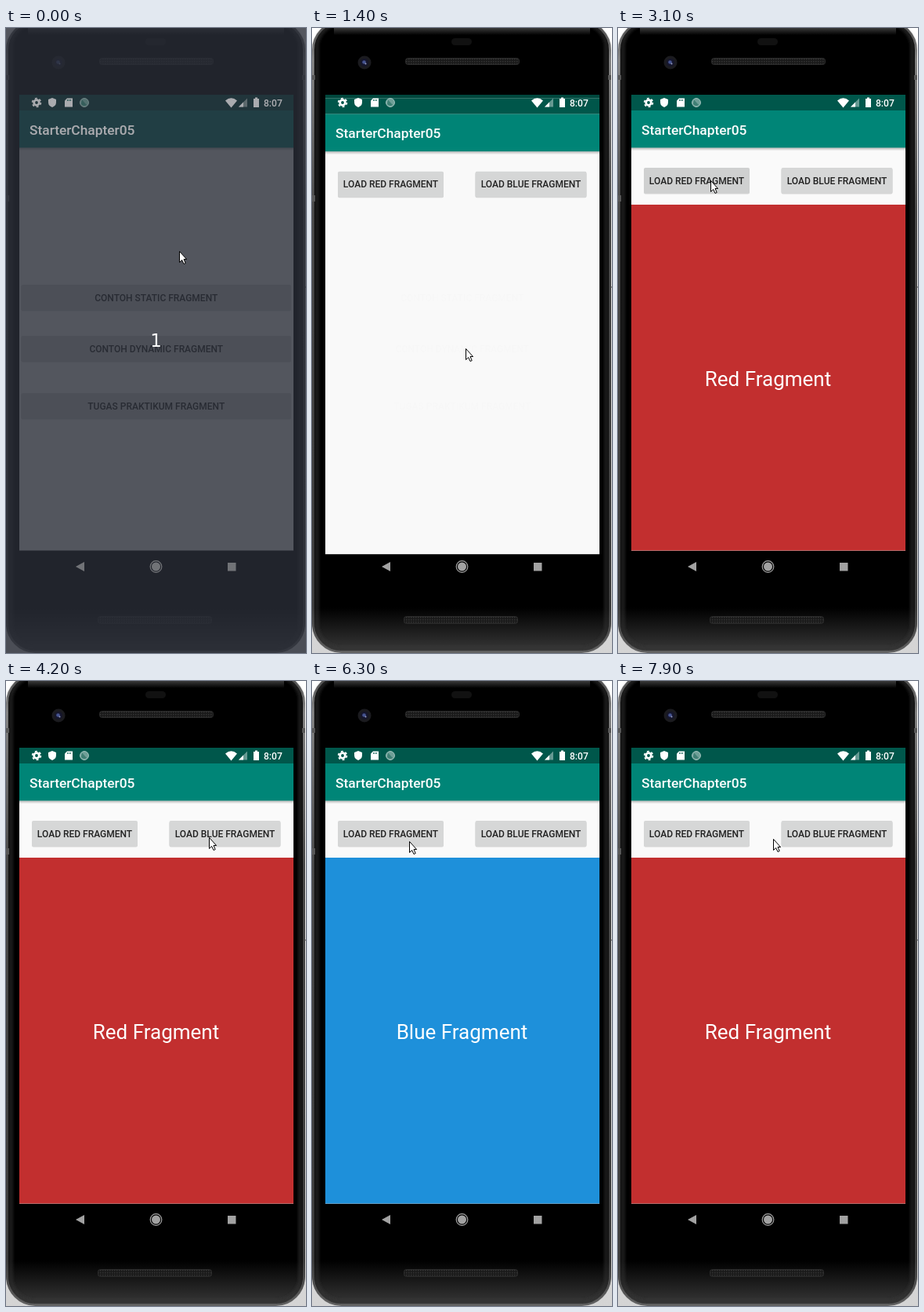
Write an HTML page that moves like this. It is 383x796 px and loops after 8000 ms.

```html
<!DOCTYPE html>
<html lang="id">
<head>
<meta charset="utf-8">
<title>Fragment demo</title>
<style>
  html, body { margin: 0; width: 100%; height: 100%; overflow: hidden; background: #f2f2f2; }
  svg { display: block; width: 383px; height: 796px; }
  text { font-family: Roboto, sans-serif; }
  .bar { font-size: 17.35px; font-weight: 500; fill: #fff; }
  .btn { font-size: 12px; font-weight: 500; fill: #212121; text-anchor: middle; }
  .big { font-size: 26px; fill: #fff; text-anchor: middle; }
  .one { font: 23px "DejaVu Sans", sans-serif; fill: #fff; text-anchor: middle; }
</style>
</head>
<body>
<svg viewBox="0 0 383 796">
  <defs>
    <linearGradient id="room" x2="0" y2="1">
      <stop offset="0" stop-color="#fff"/><stop offset="1" stop-color="#d4d4d4"/>
    </linearGradient>
    <linearGradient id="shell" x2="0" y2="1">
      <stop offset=".93"/><stop offset="1" stop-color="#383838"/>
    </linearGradient>
    <linearGradient id="rim" x2="0" y2="1">
      <stop offset="0" stop-color="#555"/><stop offset=".06" stop-color="#8a8a8a"/>
      <stop offset=".3" stop-color="#4a4a4a"/><stop offset=".93" stop-color="#3c3c3c"/>
      <stop offset="1" stop-color="#666"/>
    </linearGradient>
    <linearGradient id="shine" x2="0" y2="1">
      <stop offset="0" stop-color="#3a3a3a"/><stop offset="1" stop-color="#000"/>
    </linearGradient>
    <linearGradient id="drop" x2="0" y2="1">
      <stop offset="0" stop-opacity=".26"/><stop offset="1" stop-opacity="0"/>
    </linearGradient>
    <pattern id="mesh" width="3" height="3" patternUnits="userSpaceOnUse">
      <rect width="3" height="3" fill="#191919"/><rect width="1.5" height="1.5" fill="#343434"/>
    </pattern>
    <filter id="soft"><feGaussianBlur stdDeviation="2"/></filter>
    <clipPath id="display"><rect x="17" y="85" width="350" height="622"/></clipPath>
  </defs>

  <g id="phone">
    <rect width="383" height="796" fill="url(#room)"/>
    <rect x="1.5" y="-8" width="379" height="802.500" rx="36" fill="url(#shell)" stroke="url(#rim)" stroke-width="3"/>
    <rect x="6" y="-6" width="370" height="796" rx="31" fill="none" stroke="#353535" stroke-width="3" filter="url(#soft)"/>
    <rect x="28" width="327" height="9" fill="url(#shine)"/>
    <path d="M0 60h4v6H0zM378 60h4v6h-4zM0 213h4v8H0z" fill="#585858"/>
    <path d="M381 330h2" stroke="#444"/>
    <rect x="178" y="13" width="26" height="9" rx="4.5" fill="#111"/>
    <circle cx="67" cy="44" r="8.5" fill="#1b1b1f"/>
    <circle cx="67" cy="44" r="5" fill="#15162c"/>
    <circle cx="66.500" cy="43.500" r="2.300" fill="#45538f"/>
    <circle cx="68.500" cy="45.500" r="1" fill="#9aa0c4"/>
    <g fill="url(#mesh)" stroke="#2c2c2c">
      <rect x="119.5" y="38.5" width="145" height="8" rx="3"/>
      <rect x="117.5" y="749.5" width="145" height="9" rx="3"/>
    </g>
  </g>

  <g clip-path="url(#display)">
    <rect x="17" y="85" width="350" height="622"/>
    <g id="home"></g>
    <g id="loader"></g>
  </g>

  <g id="icons">
    <g fill="#fff">
      <circle cx="39" cy="95" r="3.3" fill="none" stroke="#fff" stroke-width="2.8"/>
      <circle cx="39" cy="95" r="5.4" fill="none" stroke="#fff" stroke-width="1.7" stroke-dasharray="2.83"/>
      <path d="M59 89l5 2v3.500q0 4.500-5 6.500q-5-2-5-6.500V91z"/>
      <path d="M78 89.500h7v11H75v-8z"/>
      <path d="M78.500 91v2M80.500 91v2M82.500 91v2" stroke="#00574b" stroke-width=".9"/>
      <circle cx="100" cy="95" r="5.400" fill="#6f9f97" stroke="#a9c8c3"/>
      <path d="M97 91.500l6 6.500a5 5 0 0 1-7-1z" fill="#3f7f74"/>
      <path d="M280 92.500q7.500-6.500 15 0L287.500 101.500z"/>
      <path d="M308 89.500v11h-11z" opacity=".4"/>
      <path d="M303 94.500v6h-6z"/>
      <path d="M318 88.500h3v1.500h2v11h-7V90h2z"/>
      <text x="329" y="99.5" font-size="12.1" font-weight="500">8:07</text>
    </g>
    <g fill="#a2a2a2">
      <path d="M89 686l11-6v12z"/>
      <circle cx="191.500" cy="686" r="5.500"/>
      <circle cx="191.500" cy="686" r="7.300" fill="none" stroke="#a2a2a2" stroke-width="1.2"/>
      <path d="M283 681h10.500v10.500H283z"/>
    </g>
  </g>

  <g id="countdown">
    <rect width="383" height="796" fill="#2a2e37" opacity=".8"/>
    <g opacity=".5">
      <use href="#icons"/>
      <text class="bar" x="30" y="135.500">StarterChapter05</text>
    </g>
    <text class="one" x="191.500" y="406">1</text>
  </g>
  <path id="cursor" d="M.5.5V14.500L3.700 11.500L6 16.500L8.200 15.500L6 10.500H9.600Z" fill="#fff" stroke="#000"/>
</svg>

<script>
const $ = id => document.getElementById(id);
const LOOP = 8000, STEP = 100, OPEN = 1268;

const button = (x, y, w, label, id = '') => `
  <rect x="${x}" y="${y + 1}" width="${w}" height="32.5" rx="2" opacity=".15"/>
  <rect id="${id}" x="${x}" y="${y}" width="${w}" height="32.5" rx="2" fill="#d6d7d7"/>
  <text class="btn" x="${x + w / 2}" y="${y + 20.7}">${label}</text>`;

const activity = content => `
  <rect x="17" y="85" width="350" height="580.500" fill="#fafafa"/>
  <rect x="17" y="85" width="350" height="20" fill="#00574b"/>
  <rect x="17" y="105" width="350" height="47.5" fill="#008577"/>
  <rect x="17" y="152.500" width="350" height="4" fill="url(#drop)"/>
  <text class="bar" x="30" y="135.500">StarterChapter05</text>${content}`;

$('home').innerHTML = activity(
  button(19.5, 327, 344.5, 'CONTOH STATIC FRAGMENT') +
  button(19.5, 392, 344.5, 'CONTOH DYNAMIC FRAGMENT', 'dynamic') +
  button(19.5, 465, 344.5, 'TUGAS PRAKTIKUM FRAGMENT'));

$('loader').innerHTML = activity(
  button(33, 178, 135, 'LOAD RED FRAGMENT', 'red') +
  button(208.5, 178, 142, 'LOAD BLUE FRAGMENT', 'blue') +
  `<g id="fragment"><rect id="pane" x="17" y="225" width="350" height="440.500"/>
   <text id="caption" class="big" x="191.500" y="456"></text></g>`);

// Pointer stops: time, x, y
const stops = [
  [0, 221, 284], [399, 221, 284], [400, 220, 287], [800, 196, 408], [1400, 196, 408],
  [2000, 118, 196], [2200, 118, 194], [3600, 118, 194], [4200, 259, 199],
  [5700, 259, 199], [6300, 124, 204], [7700, 124, 204], [7900, 198, 201], [LOOP, 198, 201]
];

function pointerAt(t) {
  const i = stops.findIndex(s => s[0] > t);
  const [t0, x0, y0] = stops[i - 1], [t1, x1, y1] = stops[i];
  const p = (t - t0) / (t1 - t0), e = p * p * (3 - 2 * p);
  return [x0 + (x1 - x0) * e, y0 + (y1 - y0) * e].map(Math.round);
}

const show = (id, on) => $(id).setAttribute('display', on ? 'inline' : 'none');
const press = (id, on) => $(id).setAttribute('fill', on ? '#cfd0d0' : '#d6d7d7');

// Remaining share of a transition that began at OPEN
const left = (t, duration) => Math.min(1, Math.max(0, 1 - (t - OPEN) / duration));

function draw(now) {
  const t = Math.floor(now % LOOP / STEP) * STEP;
  show('countdown', t < 400);
  $('cursor').setAttribute('transform', `translate(${pointerAt(t)})`);

  // The second screen fades in and slides up by 8 % while the first one dims
  $('home').setAttribute('opacity', 0.7 + 0.3 * left(t, 217));
  $('loader').setAttribute('opacity', 1 - left(t, 200) ** 4);
  $('loader').setAttribute('transform', `translate(0 ${50 * left(t, 350) ** 5})`);

  const blue = t >= 5300 && t < 7200;
  show('fragment', t >= 3100);
  $('pane').setAttribute('fill', blue ? '#1e90da' : '#c22f2f');
  $('caption').textContent = (blue ? 'Blue' : 'Red') + ' Fragment';

  press('dynamic', t >= 1200);
  press('red', t >= 3100 && t < 3500 || t >= 7200 && t < 7600);
  press('blue', t >= 5300 && t < 5600);
}

const start = performance.now();
function tick() {
  draw(performance.now() - start);
  requestAnimationFrame(tick);
}
tick();
</script>
</body>
</html>
```
